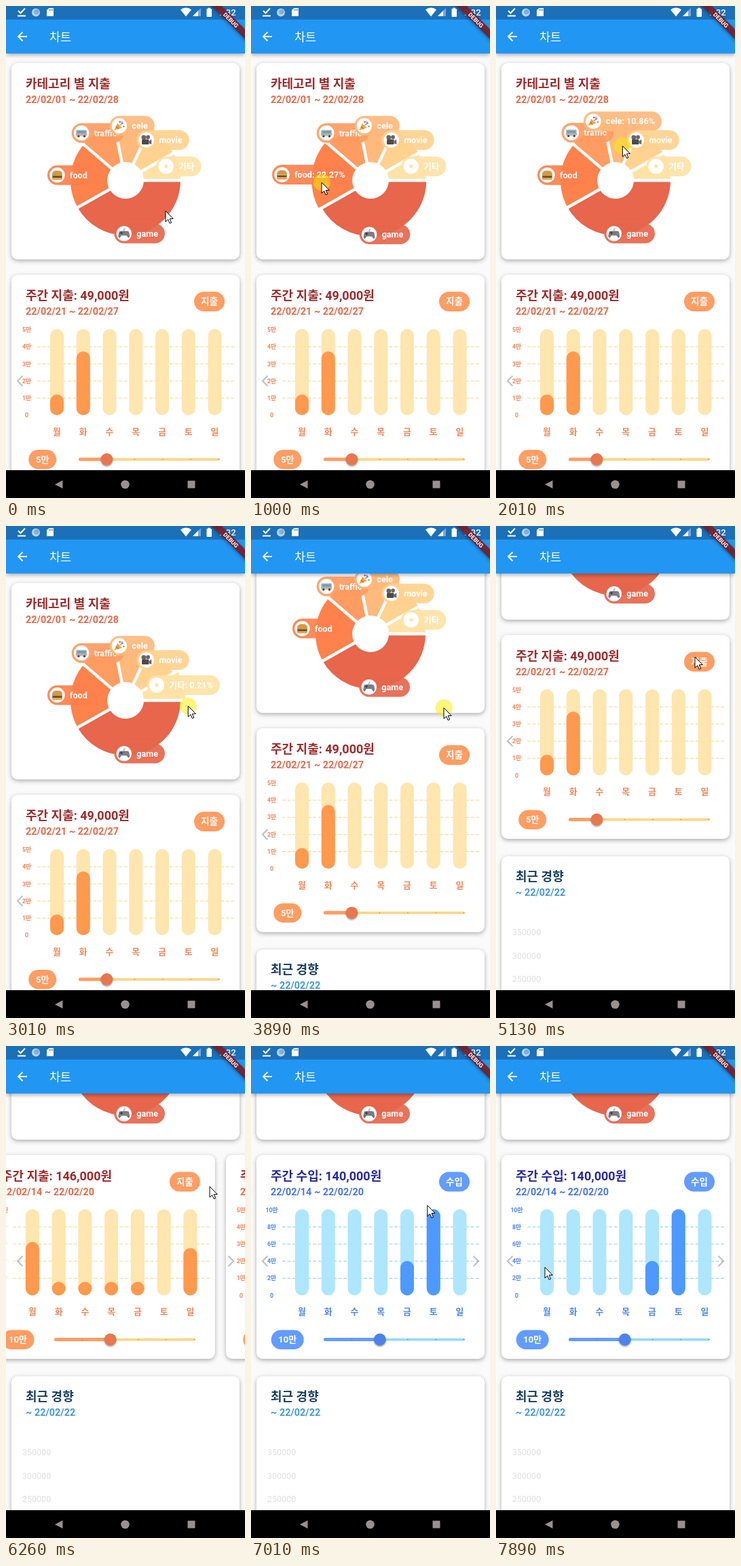
Animation of 352x725 px, one loop 8 s. Source, as an HTML page with a canvas:

```html
<!DOCTYPE html>
<html lang="ko">
<head>
<meta charset="utf-8">
<title>차트</title>
<style>
html, body { margin: 0; width: 100%; height: 100%; overflow: hidden; background: #fafafa; }
canvas { display: block; width: 352px; height: 725px; }
</style>
</head>
<body>
<canvas id="stage" width="352" height="725"></canvas>
<script>
const g = document.getElementById('stage').getContext('2d');
const LOOP = 8000, STEP = 125.2, TAU = Math.PI * 2, RAD = Math.PI / 180;
const FONT = 'Roboto, "Noto Sans CJK KR", "Noto Sans CJK", sans-serif';

// Pointer path: time, x, y
const PATH = [
  [0, 235, 302], [120, 235, 302], [500, 200, 300], [880, 107, 262], [1000, 104, 260],
  [1120, 106, 254], [1500, 140, 218], [1860, 170, 204], [2000, 186, 206], [2350, 222, 222],
  [2640, 246, 243], [3000, 268, 265], [3150, 275, 272], [3500, 285, 376], [3640, 285, 376],
  [4131, 283, 156], [4380, 283, 130.5], [4520, 284, 136], [4770, 293, 193], [5133, 293, 193],
  [5300, 301, 189], [5750, 25, 316], [5960, 25, 316], [6260, 300, 207], [6760, 300, 207],
  [7510, 180, 290], [7637, 111, 314], [7885, 72, 326]
];
const PRESSES = [[120, 3150], [3540, 4385], [5740, 5960], [6600, 6760]];

// Category: name, colour, start angle, share, time touched, icon
const SLICES = [
  ['game', '#e7664c', 0, '47.77%', 120, gamepad],
  ['food', '#ff814c', 150.5, '22.27%', 880, burger],
  ['traffic', '#ff9c61', 220.6, '11.90%', 1250, bus],
  ['cele', '#ffb97b', 258.6, '10.86%', 1860, popper],
  ['movie', '#ffd28f', 295, '6.99%', 2240, camera],
  ['기타', '#ffe2a6', 330.4, '0.21%', 2740, star]
];
const RELEASE = 3200;

const SPEND = { title: '#9f2a2a', date: '#e8694b', button: '#ff9d63', label: '#f0875a', grid: '#ffdca0',
  back: '#ffe5ae', bar: '#ff994d', thumb: '#e8764f', track: '#ffd584' };
const INCOME = { title: '#28289f', date: '#4a74ee', button: '#639cff', label: '#4d86f0', grid: '#9fd8f8',
  back: '#aee6ff', bar: '#4d99ff', thumb: '#4d82ea', track: '#97d8fb' };

const LAST_WEEK = { x: -1, kind: '지출', sum: '146,000', dates: '22/02/14 ~ 22/02/20', max: 10, bars: [.62, .07, .08, .06, .08, 0, .55] };
const EARNED = [0, 0, 0, 0, .4, 1, 0];
const THIS_WEEK = { kind: '지출', sum: '49,000', dates: '22/02/21 ~ 22/02/27', max: 5, bars: [.24, .74, 0, 0, 0, 0, 0] };

const clamp = v => Math.max(0, Math.min(1, v));
const lerp = (a, b, k) => a + (b - a) * k;
const ramp = (t, start, length) => clamp((t - start) / length);
const easeInOut = k => k < .5 ? 4 * k ** 3 : 1 - 4 * (1 - k) ** 3;

function mix(a, b, k) {
  const part = (hex, i) => parseInt(hex.slice(i, i + 2), 16);
  return `rgb(${[1, 3, 5].map(i => Math.round(lerp(part(a, i), part(b, i), k)))})`;
}

function text(str, x, y, size, color, weight = 'bold', align = 'left') {
  g.font = `${weight} ${size}px ${FONT}`;
  g.textAlign = align;
  g.fillStyle = color;
  g.fillText(str, x, y + size * .36);
}
const centered = (str, x, y, size, color) => text(str, x, y, size, color, 'bold', 'center');

function rect(x, y, w, h, color) { g.fillStyle = color; g.fillRect(x, y, w, h); }
function box(x, y, w, h, r, color) {
  g.beginPath(); g.roundRect(x, y, w, h, r); g.fillStyle = color; g.fill();
}
function dot(x, y, r, color) {
  g.beginPath(); g.arc(x, y, r, 0, TAU); g.fillStyle = color; g.fill();
}
function poly(points, color) {
  g.beginPath(); points.forEach(p => g.lineTo(...p)); g.closePath(); g.fillStyle = color; g.fill();
}
function line(points, width, color) {
  g.beginPath(); points.forEach(p => g.lineTo(...p)); g.lineWidth = width; g.strokeStyle = color; g.stroke();
}
function shaded(blur, alpha, draw) {
  g.save();
  g.shadowColor = `rgba(0,0,0,${alpha})`; g.shadowBlur = blur; g.shadowOffsetY = 2;
  draw();
  g.restore();
}
const card = (y, h) => shaded(6, .32, () => box(8, y, 336, h, 9, '#fff'));

// Icons, each drawn around (0, 0)
function burger() {
  box(-8, -7, 16, 7, [7, 7, 1, 1], '#dd9446');
  rect(-8, 0, 16, 2, '#7fae3f');
  rect(-7.5, 1.5, 15, 2.5, '#7b3b22');
  box(-8, 4, 16, 3.5, [0, 0, 3, 3], '#e3a455');
}
function bus() {
  box(-8.5, -5, 17, 10, 2, '#b9c3cb');
  rect(-7, -3.5, 14, 4, '#6d9dbb');
  rect(-8.5, 1.5, 17, 1.2, '#e58a5a');
  dot(-4.5, 5, 1.8, '#444'); dot(4.5, 5, 1.8, '#444');
}
function popper() {
  poly([[-8, 7], [-3, -4], [4, 3]], '#efa83a');
  line([[-5, 1], [-1, 5]], 1.5, '#d9603b');
  dot(1, -6, 1.4, '#d94b58'); dot(5, -4, 1.3, '#4a9bd0'); dot(7, 1, 1.3, '#79b04c');
  line([[1, -1], [4, -3], [4, -7]], 1.2, '#c35b9a');
}
function camera() {
  dot(-4, -4, 3.6, '#6b6565'); dot(2.5, -4.5, 3, '#6b6565');
  box(-7, -1, 11, 8, 1.5, '#4f4a4a');
  poly([[4, 2], [8, -1], [8, 7], [4, 5]], '#6b6565');
}
function star() { centered('*', 0, 2, 16, '#ffdd9a'); }
function gamepad() {
  box(-8, -4, 16, 7, 3.5, '#777c86');
  poly([[-8, -1], [-3, 2], [-7, 7], [-9, 5]], '#777c86');
  poly([[8, -1], [3, 2], [7, 7], [9, 5]], '#777c86');
  line([[0, -4], [0, -7], [2, -8]], 1, '#777c86');
  rect(-6, -1.5, 4, 1.2, '#333'); rect(-4.6, -2.9, 1.2, 4, '#333');
  dot(4, -2, 1.1, '#d95b4b'); dot(5.6, 0, 1.1, '#4a9bd0');
}

function pie(t) {
  const cx = 176, cy = 257;
  const parts = SLICES.map(([name, color, from, share, on, icon], i) => {
    const next = SLICES[i + 1], off = next ? next[4] : RELEASE;
    return { name, color, icon, from: from * RAD, to: (next ? next[2] : 360) * RAD,
      label: t >= on && t < off ? `${name}: ${share}` : name,
      r: 81 + 7 * (ramp(t, on, 150) - ramp(t, off, 150)) };
  });
  for (const p of parts) {
    g.beginPath();
    g.moveTo(cx, cy); g.arc(cx, cy, p.r, p.from, p.to);
    g.fillStyle = p.color; g.fill();
  }
  for (const p of parts)
    line([[cx, cy], [cx + 92 * Math.cos(p.from), cy + 92 * Math.sin(p.from)]], 4.5, '#fff');
  dot(cx, cy, 27, '#fff');
  for (const p of parts) {
    const mid = (p.from + p.to) / 2;
    g.font = `bold 12.6px ${FONT}`;
    const w = 43 + g.measureText(p.label).width;
    const x = cx + p.r * Math.cos(mid) - w / 2, y = cy + p.r * Math.sin(mid);
    g.globalAlpha = .92;
    box(x, y - 14.5, w, 29, 14.5, p.color);
    g.globalAlpha = 1;
    dot(x + 14.5, y, 11.2, '#fff');
    g.save(); g.translate(x + 14.5, y); g.scale(.95, .95); p.icon(); g.restore();
    text(p.label, x + 33, y, 12.6, '#fff');
  }
}

function week(data, dx, k) {
  const tone = name => mix(SPEND[name], INCOME[name], k);
  g.save();
  g.translate(dx, 0);
  card(396, 300.5);
  text(`주간 ${data.kind}: ${data.sum}원`, 29, 427, 18, tone('title'));
  text(data.dates, 29, 450, 14.4, tone('date'));
  box(277, 421, 45, 29, 14.5, tone('button'));
  centered(data.kind, 299.5, 435.5, 13.5, '#fff');

  g.setLineDash([5, 2.5]);
  for (let i = 0; i < 6; i++) {
    const y = 477 + i * 25.2, value = data.max * (5 - i) / 5;
    centered(value ? value + '만' : '0', 30.5, y, 8.8, tone('label'));
    if (i > 0 && i < 5) line([[46, y], [336, y]], 1.3, tone('grid'));
  }
  g.setLineDash([]);
  const height = v => v ? Math.max(20, v * 127) : 0;
  data.bars.forEach((v, i) => {
    const x = 75 + i * 38.75, h = lerp(height(v), height(EARNED[i]), k);
    box(x - 10, 476, 20, 127, 10, tone('back'));
    if (h > 0) box(x - 10, 603 - h, 20, h, Math.min(10, h / 2), tone('bar'));
    centered('월화수목금토일'[i], x, 627, 12.8, tone('label'));
  });

  const thumb = 107 + 41.4 * data.max / 5, pill = data.max > 9 ? 48 : 41;
  box(53.7 - pill / 2, 654, pill, 28.5, 14.2, tone('button'));
  centered(data.max + '만', 53.7, 668, 13, '#fff');
  box(107, 666.3, 208, 3.6, 1.8, tone('track'));
  box(107, 665.4, thumb - 107, 5.2, 2.6, tone('button'));
  for (let i = 1; i < 6; i++) dot(107 + i * 41.3, 668, .8, tone('thumb'));
  shaded(2, .3, () => dot(thumb, 668, 9, tone('thumb')));
  g.restore();
}

function content(t, scroll) {
  rect(0, 0, 352, 725, '#fafafa');
  g.save();
  g.translate(0, -scroll);
  card(84, 289.5);
  text('카테고리 별 지출', 29, 115, 18, '#9f2a2a');
  text('22/02/01 ~ 22/02/28', 29, 138, 14.4, '#e8694b');
  pie(t);

  const slide = easeInOut(ramp(t, 5978, 400)), k = ramp(t, 6700, 260);
  const shown = k > 0 ? { ...LAST_WEEK, kind: '수입', sum: '140,000' } : LAST_WEEK;
  if (slide < 1) week(THIS_WEEK, slide * 352, 0);
  if (slide > 0) week(shown, (slide - 1) * 352, k);
  const grey = 'rgba(160,160,160,.65)';
  line([[24.5, 545], [17, 552.5], [24.5, 560]], 2.2, grey);
  if (slide > .5) line([[327.5, 545], [335, 552.5], [327.5, 560]], 2.2, grey);

  card(722, 400);
  text('최근 경향', 29, 752, 18, '#173f64');
  text('~ 22/02/22', 29, 775, 14.4, '#4398e3');
  for (let i = 0; i < 4; i++) text(350000 - i * 50000, 24, 834 + i * 34.5, 12.5, '#dfdfdf', 'normal');
  g.restore();
}

function chrome() {
  shaded(6, .35, () => rect(0, 0, 352, 70, '#2196f3'));
  rect(0, 0, 352, 20, '#1c70b8');
  line([[18, 7], [21.5, 10.5], [28, 3.5]], 2, '#fff');
  rect(17, 13.5, 12, 2, '#fff');
  dot(44, 9.5, 6, '#b9d3ea'); dot(45, 8.5, 3.8, '#7fb0da');
  poly([[60, 6], [63.5, 3], [70, 3], [70, 15], [60, 15]], '#fff');
  for (const x of [63.5, 65.7, 67.9]) rect(x, 4.5, 1, 2.5, '#1c70b8');
  g.beginPath(); g.moveTo(265, 15.5); g.arc(265, 14.5, 12, -132 * RAD, -48 * RAD); g.fillStyle = '#fff'; g.fill();
  poly([[275, 15], [287, 15], [287, 3]], 'rgba(255,255,255,.4)');
  poly([[275, 15], [283, 15], [283, 7]], '#fff');
  box(295.5, 4, 7.5, 12, 1, '#fff'); rect(297.5, 2.7, 3.5, 2, '#fff');
  text('9:32', 313, 9.7, 13, '#fff', 500);

  line([[24.5, 38.5], [18, 45], [24.5, 51.5]], 1.9, '#fff');
  line([[18, 45], [31, 45]], 1.9, '#fff');
  text('차트', 64, 45.5, 17.5, '#fff', 'normal');

  g.save();
  g.translate(352, 0); g.rotate(45 * RAD);
  shaded(4, .4, () => rect(-40, 24.2, 80, 10.3, 'rgba(120,30,42,.88)'));
  centered('DEBUG', 0, 29.4, 8.6, '#fff');
  g.restore();

  rect(0, 684, 352, 41, '#000');
  poly([[72, 705], [83.5, 699], [83.5, 711]], '#9a8f91');
  dot(175.5, 705, 6.3, '#9a8f91');
  rect(267.5, 699.5, 11, 11, '#9a8f91');
}

function pointerAt(t) {
  const i = PATH.findIndex(p => p[0] > t);
  if (i < 0) return PATH[PATH.length - 1].slice(1);
  const a = PATH[i - 1], b = PATH[i], k = ramp(t, a[0], b[0] - a[0]);
  return [lerp(a[1], b[1], k), lerp(a[2], b[2], k)];
}

function pointer(t, x, y) {
  if (PRESSES.some(([from, to]) => t >= from && t < to)) dot(x, y, 12.5, 'rgba(255,235,0,.52)');
  g.save();
  g.translate(x, y);
  poly([[0, 0], [0, 16], [3.7, 12.6], [6.2, 18.3], [8.6, 17.2], [6.2, 11.7], [11.2, 11.5]], '#fff');
  g.lineWidth = 1; g.strokeStyle = '#000'; g.stroke();
  g.restore();
}

function frame(now) {
  const t = Math.floor((now % LOOP) / STEP + .05) * STEP;
  const [x, y] = pointerAt(t);
  const scroll = t < 3540 ? 0 : t < 4385 ? Math.max(0, 366 - y) : 235.5;
  content(t, scroll);
  chrome();
  pointer(t, x, y);
}

const begin = performance.now();
function tick() {
  frame(performance.now() - begin);
  requestAnimationFrame(tick);
}
tick();
</script>
</body>
</html>
```
